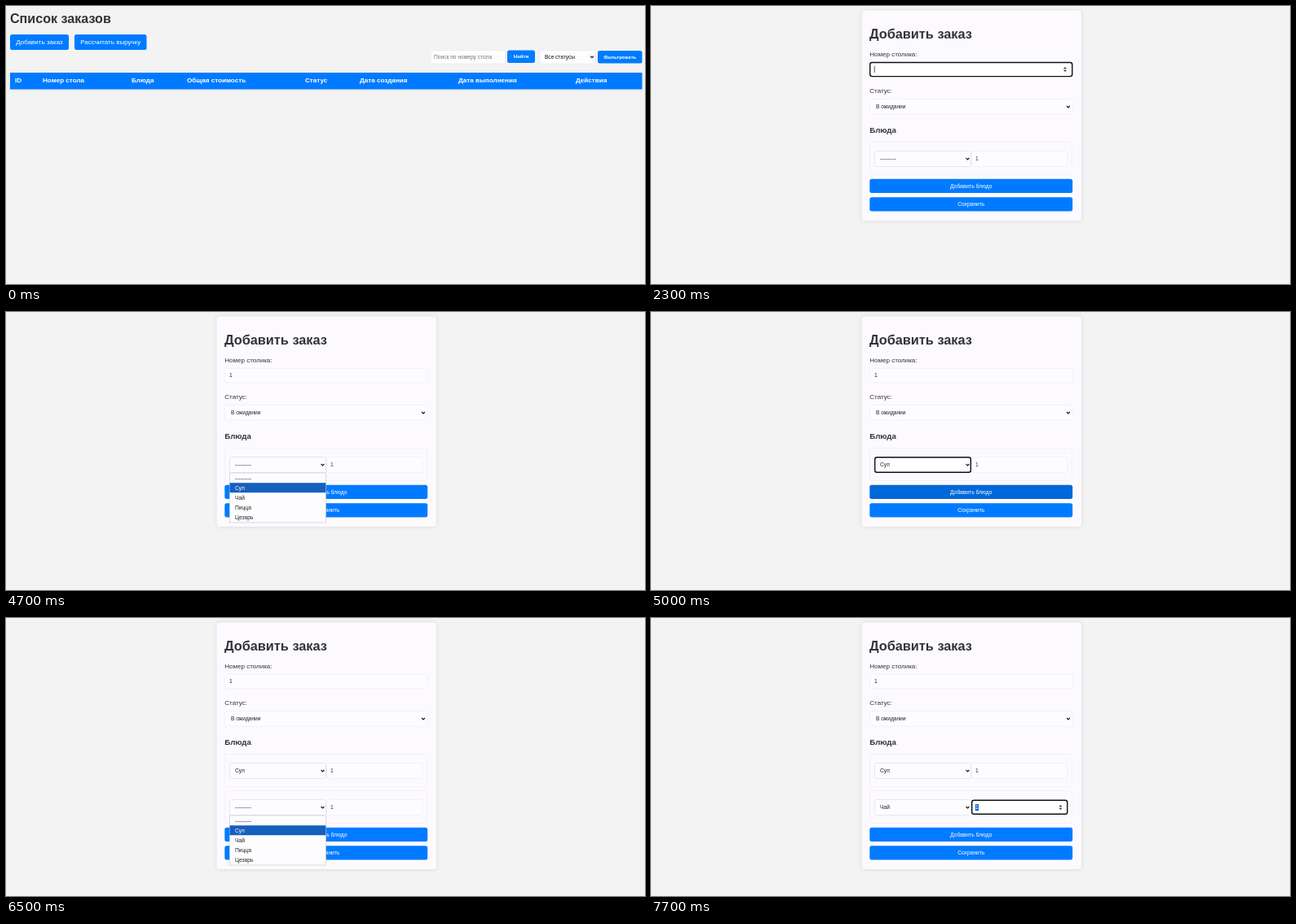
An HTML page for the animation above (8 s loop, 784 px wide and 342 px high).

```html
<!DOCTYPE html>
<html lang="ru">
<head>
<meta charset="utf-8">
<title>Список заказов</title>
<style>
  html, body { margin: 0; height: 100%; overflow: hidden; background: #f3f3f3; }
  svg { display: block; width: 100%; height: 100%; }
  text { font-family: "Liberation Sans", Arial, sans-serif; white-space: pre; }
</style>
</head>
<body>
<svg id="stage" viewBox="0 0 784 342"></svg>
<script>
const LOOP = 8000;
const BLUE = '#007bff', INK = '#333', FIELD = '#fdfcff', LINE = '#f1f0f0';
const DISHES = ['---------', 'Суп', 'Чай', 'Пицца', 'Цезарь'];
const stage = document.getElementById('stage');

const rect = (x, y, w, h, fill, r = 0, extra = '') =>
  `<rect x="${x}" y="${y}" width="${w}" height="${h}" rx="${r}" fill="${fill}" ${extra}/>`;
const text = (x, y, s, size = 6.7, fill = INK, extra = '') =>
  `<text x="${x}" y="${y}" font-size="${size}" fill="${fill}" ${extra}>${s}</text>`;
const bold = (x, y, s, size, fill) => text(x, y, s, size, fill, 'font-weight="700"');

const button = (x, y, w, h, label, size = 6.7, fill = BLUE, weight = 400) =>
  rect(x, y, w, h, fill, 2.5) +
  text(x + w / 2, y + h / 2 + size * 0.35, label, size, '#fff',
    `text-anchor="middle" font-weight="${weight}"`);

const box = (x, y, w, h, focus, line = LINE) => focus
  ? rect(x + .7, y + .7, w - 1.4, h - 1.4, '#fff', 2.5, 'stroke="#111" stroke-width="1.4"')
  : rect(x + .5, y + .5, w - 1, h - 1, FIELD, 2, `stroke="${line}" stroke-width=".8"`);
const chevron = (x, y) =>
  `<path d="M${x - 1.9} ${y - 1}l1.9 2 1.9-2" fill="none" stroke="#111" stroke-width="1.1"/>`;
const spinner = (x, y) =>
  `<path d="M${x - 2} ${y - .7}l2-2.2 2 2.2zM${x - 2} ${y + .7}l2 2.2 2-2.2z" fill="#333"/>`;
const caret = (x, y) => rect(x, y, .7, 8, '#111');

// CSS-like "ease" between the normal and hover blue
function shade(k) {
  k = Math.min(1, Math.max(0, k));
  k = k * k * (3 - 2 * k);
  return `rgb(0,${Math.round(123 - 37 * k)},${Math.round(255 - 76 * k)})`;
}

function listPage(t) {
  const columns = [[11, 'ID'], [45, 'Номер стола'], [154, 'Блюда'], [222, 'Общая стоимость'],
    [367, 'Статус'], [434, 'Дата создания'], [555, 'Дата выполнения'], [699, 'Действия']];
  return bold(5, 20.6, 'Список заказов', 16.1, INK) +
    button(5, 35, 72, 19, 'Добавить заказ', 8, shade((t - 650) / 300)) +
    button(84, 35, 88.5, 19, 'Рассчитать выручку', 8) +
    box(520.5, 54, 92.5, 17.5, false, '#ececec') +
    text(525, 65, 'Поиск по номеру стола', 6.65, '#777') +
    button(615, 54.5, 34, 15.5, 'Найти', 6.2, BLUE, 700) +
    box(654.5, 54, 69, 17.5, false, '#ececec') +
    text(661, 65, 'Все статусы', 6.55, '#111') + chevron(719, 62.7) +
    button(726, 55, 54.5, 15.5, 'Фильтровать', 6.1, BLUE, 700) +
    rect(5, 82, 775.5, 20.5, BLUE, 0, 'style="filter:drop-shadow(0 1px 2px #0001)"') +
    columns.map(([x, s]) => bold(x, 94.4, s, 8.1, '#fff')).join('');
}

function dishRow(y, dish, selectFocus, qtyFocus, selected, caretOn) {
  const base = y + 12.4;
  return rect(268.5, y - 10.5, 248, 40, '#fcfaff', 2, `stroke="${LINE}" stroke-width=".8"`) +
    box(274, y, 119, 20, selectFocus, '#e3e3e8') +
    text(281, base, dish, 6.7, '#222') + chevron(388.5, y + 10) +
    box(393, y + (qtyFocus ? .5 : 0), 118.5, qtyFocus ? 18.5 : 20, qtyFocus) +
    (selected ? rect(397.8, y + 6, 4.2, 8.2, '#1769d2') : '') +
    text(398, base, '1', 6.7, selected ? '#fff' : INK) +
    (caretOn ? caret(402, y + 6) : '') + (qtyFocus ? spinner(502.5, y + 10) : '');
}

function dropdown(y, active) {
  return rect(274.3, y, 118.2, 61, '#fdfcff', 0, 'stroke="#c4c4c8" stroke-width=".6"') +
    DISHES.map((s, i) => (i === active ? rect(274.5, y + .2 + i * 12, 117.8, 12, '#1660bd') : '') +
      text(281, y + 8.5 + i * 12, s, 6.7, i === active ? '#fff' : '#222')).join('');
}

function formPage(t) {
  const between = (a, b) => t >= a && t < b;
  const two = t >= 5500, shift = two ? 45 : 0;
  const focus = between(2200, 4200);
  const typed = t >= 3000;
  const blink = between(2200, 2700) || between(3000, 3500) || between(4100, 4200);
  const hover = two ? 1 - (t - 5500) / 300 : (t - 4850) / 300;
  const qty = t >= 7200, marked = t >= 7500;
  let s = rect(258.5, 5.5, 269.5, 258.5 + shift, '#fcfaff', 4,
    'style="filter:drop-shadow(0 0 2.5px #0000001c)"') +
    bold(268, 40.4, 'Добавить заказ', 16.3, INK) +
    text(268.3, 62, 'Номер столика:', 8) +
    box(268, 68.8, 249.5, 18.5, focus) +
    (typed ? text(274, 80.4, '1', 6.7, '#222') : '') +
    (blink ? caret(typed ? 277.8 : 273.8, 74) : '') +
    (between(2100, 4200) ? spinner(508, 78) : '') +
    text(268.3, 107, 'Статус:', 8) +
    box(268, 114, 249.5, 19.5, false) +
    text(276, 126.2, 'В ожидании', 6.6, '#222') + chevron(512, 124) +
    bold(268.3, 156.4, 'Блюда', 9.6, INK) +
    dishRow(178, DISHES[t >= 4900 ? 1 : 0], between(4900, 5500));
  if (two) {
    s += dishRow(223, DISHES[t >= 6900 ? 2 : 0], between(6900, 7200), qty, marked, qty && !marked);
  }
  s += button(268.3, 212.8 + shift, 248.9, 17.2, 'Добавить блюдо', 6.7, shade(hover)) +
    button(268.3, 235.3 + shift, 248.9, 17.2, 'Сохранить');
  if (between(4300, 4900)) s += dropdown(198, t < 4700 ? 0 : 1);
  if (between(6000, 6900)) s += dropdown(243, t < 6500 ? 0 : t < 6600 ? 1 : 2);
  return s;
}

let shown = '';
function draw(now) {
  const t = now % LOOP;
  const next = t < 1400 ? listPage(t) : formPage(t);
  if (next !== shown) stage.innerHTML = shown = next;
  requestAnimationFrame(draw);
}
draw(0);
</script>
</body>
</html>
```
